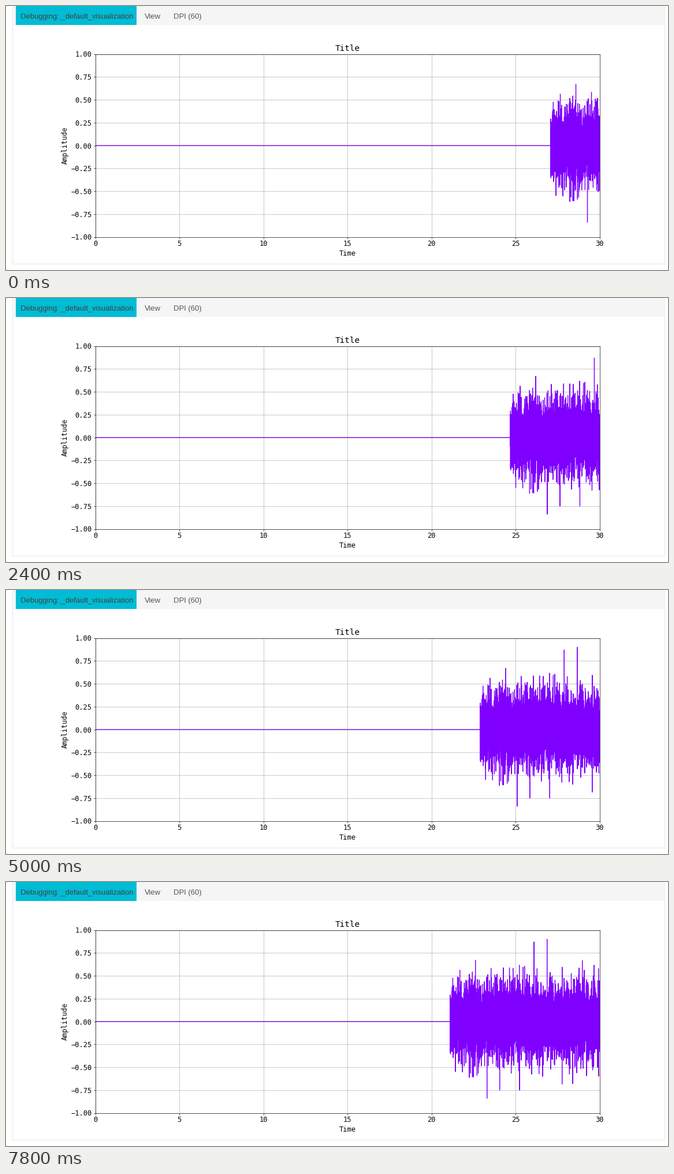
Animation of 1146 by 459 pixels, one loop 8000 ms. Source, as a matplotlib script:

```python
import numpy as np
import matplotlib.pyplot as plt
from matplotlib.animation import FuncAnimation
from matplotlib.patches import Rectangle

W, H = 1146, 459
FRAMES, INTERVAL = 80, 100
PX_PER_UNIT = 29.1
SAMPLES_PER_PX = 24
SIGNAL_PX = 260
START = 27.08          # where the signal begins in the first frame
CHUNK = 0.0996         # time units appended per update

# At 72 dpi one point equals one pixel.
plt.rcParams.update({
    "font.family": "DejaVu Sans Mono", "font.size": 12,
    "axes.titlesize": 14.4, "axes.titlepad": 5, "axes.labelpad": 3.33,
    "axes.linewidth": 0.67, "grid.linewidth": 0.67, "grid.color": "#b0b0b0",
    "xtick.major.size": 2.92, "ytick.major.size": 2.92,
    "xtick.major.pad": 2.92, "ytick.major.pad": 2.92,
    "xtick.major.width": 0.67, "ytick.major.width": 0.67,
})


def make_signal():
    """Dense noise, scattered medium peaks and a few tall spikes."""
    rng = np.random.default_rng(11)
    pos = np.arange(SIGNAL_PX * SAMPLES_PER_PX) / SAMPLES_PER_PX
    amp = rng.normal(0, 0.185, pos.size)
    loud = np.abs(amp) > 0.5
    amp[loud] = np.sign(amp[loud]) * rng.uniform(0.2, 0.52, loud.sum())
    medium = rng.integers(0, pos.size, 60)
    amp[medium] = rng.choice([-1, 1], 60) * rng.uniform(0.48, 0.62, 60)
    spikes = {44: .67, 64: -.84, 86: -.75, 120.5: -.75, 145.5: .87,
              168: .90, 194: -.685, 212.5: -.68, 229: .665}
    for where, height in spikes.items():
        amp[int(where * SAMPLES_PER_PX)] = height
    return pos / PX_PER_UNIT, amp


def chunks_received(frame):
    """Real-time at first, then a stall, a catch-up and a slower pace."""
    progress = np.interp(frame, [0, 2, 3, 24, 28, 29, 69, 77, 78],
                         [0, 3, 3, 24, 24, 28.3, 55, 59, 60])
    return int(progress + 1e-9)


fig = plt.figure(figsize=(W / 72, H / 72), dpi=72, facecolor="white")


def box(x0, y0, x1, y1, color):
    fig.add_artist(Rectangle((x0 / W, 1 - y1 / H), (x1 - x0) / W,
                             (y1 - y0) / H, color=color, lw=0, zorder=-1))


def label(x, text, color):
    fig.text(x / W, 1 - 22 / H, text, color=color, size=13,
             family="Liberation Sans", va="baseline")


box(10, 0, 1142, 450, "#f5f5f5")
box(13, 33, 1139, 447, "white")
box(17, 0, 226, 33, "#00bcd4")
label(25, "Debugging: _default_visualization", "#424242")
label(240, "View", "#555555")
label(290, "DPI (60)", "#555555")

ax = fig.add_axes([154.5 / W, 1 - 401.5 / H, 873 / W, 318 / H])
ax.set(xlim=(0, 30), ylim=(-1, 1), title="Title", xlabel="Time",
       ylabel="Amplitude", xticks=np.arange(0, 31, 5),
       yticks=np.linspace(-1, 1, 9))
ax.grid(True)
wave, = ax.plot([], [], color="#7f00ff", lw=1.25)

offsets, amplitudes = make_signal()


def update(frame):
    edge = START - CHUNK * chunks_received(frame)
    visible = offsets <= 30 - edge
    wave.set_data(np.r_[0, edge, edge + offsets[visible]],
                  np.r_[0, 0, amplitudes[visible]])
    return wave,


anim = FuncAnimation(fig, update, frames=FRAMES, interval=INTERVAL,
                     repeat=True, repeat_delay=0)
plt.show()
```
